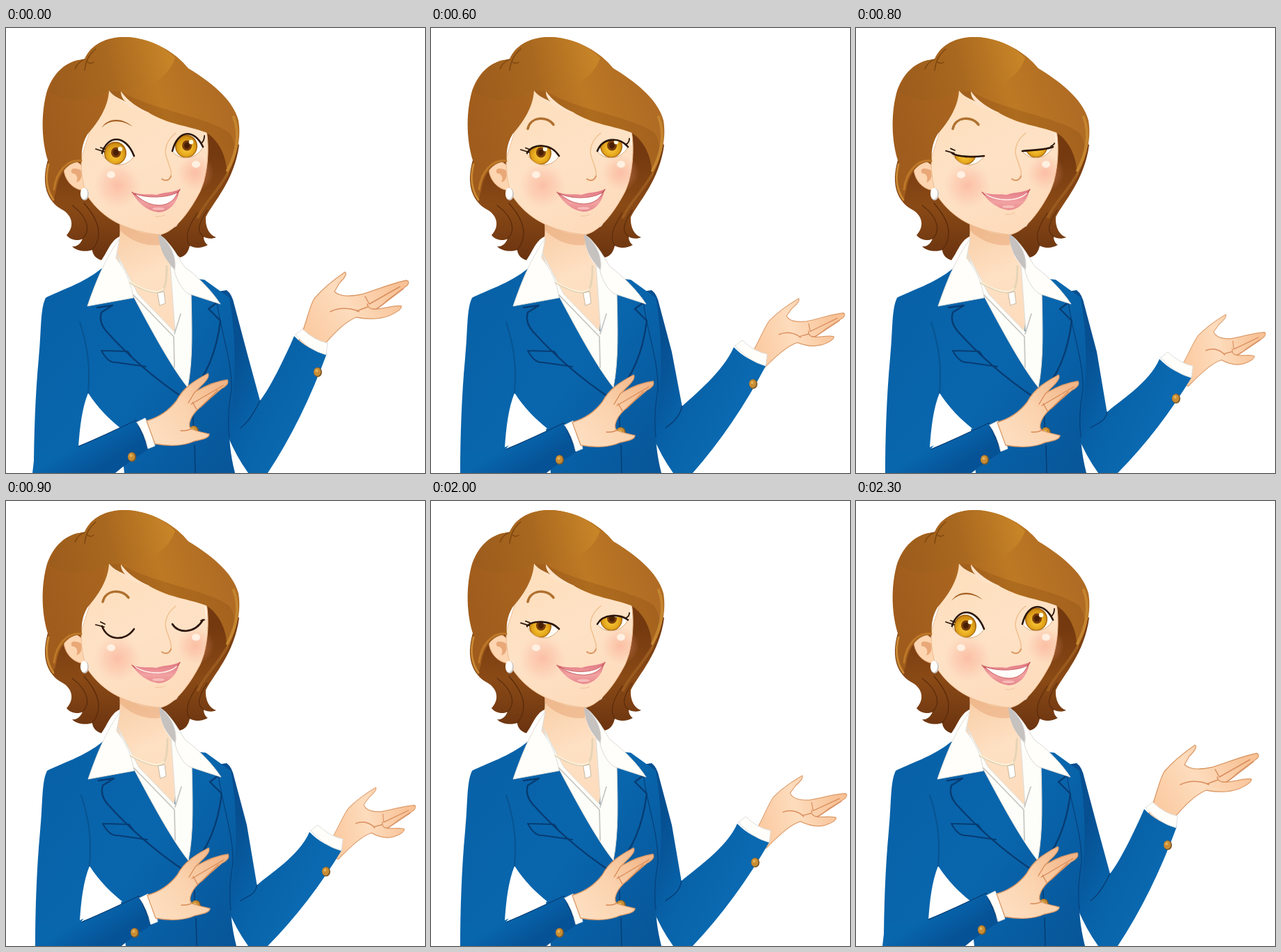
An HTML page with a canvas that plays this animation: 602 by 640 pixels, repeating every 2.8 s.

```html
<!DOCTYPE html>
<html lang="en">
<head>
<meta charset="utf-8">
<title>Presenter</title>
<style>
html, body { margin: 0; width: 100%; height: 100%; overflow: hidden; background: #fff; }
canvas { display: block; }
</style>
</head>
<body>
<canvas id="stage" width="602" height="640"></canvas>
<script>
const ctx = document.getElementById('stage').getContext('2d');
const LOOP = 2800;
const NAVY = '#073c73', EDGE = '#dc9a68', LASH = '#2b150b';

// From looking up with an open arm (first) to eyes shut with a lowered arm (last).
// hand: wrist, thumb tip, fingertip.
const POSES = [
  { eye: 1, mouth: 1, cuff: [0, 0], button: [448, 495], hand: [437, 440, 487, 352, 578, 366] },
  { eye: .87, mouth: 1, cuff: [14, 10], button: [460, 505], hand: [465, 462, 522, 386, 590, 403] },
  { eye: .75, mouth: .75, cuff: [21, 16], button: [463, 512], hand: [471, 468, 528, 390, 594, 413] },
  { eye: .63, mouth: .4, cuff: [26, 21], button: [466, 520], hand: [477, 474, 533, 396, 597, 424] },
  { eye: .33, mouth: 0, cuff: [22, 33], button: [460, 533], hand: [475, 490, 531, 413, 588, 441] },
  { eye: 0, mouth: 0, cuff: [22, 33], button: [460, 533], hand: [475, 490, 531, 413, 588, 441] }
];

function blend(gradient, colors) {
  colors.forEach((c, i) => gradient.addColorStop(i / (colors.length - 1), c));
  return gradient;
}
const linear = (x0, y0, x1, y1, ...colors) => blend(ctx.createLinearGradient(x0, y0, x1, y1), colors);
const radial = (x, y, r, ...colors) => blend(ctx.createRadialGradient(x, y, 0, x, y, r), colors);

function shape(d, fill, edge, width = 1) {
  const path = new Path2D(d);
  if (fill) { ctx.fillStyle = fill; ctx.fill(path); }
  if (edge) { ctx.strokeStyle = edge; ctx.lineWidth = width; ctx.stroke(path); }
}
const line = (d, color, width) => shape(d, null, color, width);

function oval(x, y, rx, ry, fill) {
  ctx.beginPath();
  ctx.ellipse(x, y, rx, ry, 0, 0, 7);
  ctx.fillStyle = fill;
  ctx.fill();
}

function shifted(x, y, draw) {
  ctx.save();
  ctx.translate(x, y);
  draw();
  ctx.restore();
}

function button(x, y, r = 6) {
  oval(x, y, r, r + 1, '#7d5a2b');
  oval(x - .8, y - .5, r - 1, r, '#c98d34');
  oval(x - 1.5, y - 2, r / 3, r / 3, '#e5b45c');
}

const backHair = linear(0, 180, 0, 330, '#74390f', '#8a4a16', '#6b3410');
const frontHair = linear(60, 150, 300, 70, '#a05c1c', '#a8641f', '#bd7923', '#b06c24');
const crown = linear(60, 80, 240, 40, '#9c5c1c', '#a9681f', '#c98628');
const cloth = linear(40, 400, 330, 620, '#0861a7', '#0966ad', '#075699');
const palm = linear(430, 450, 560, 370, '#fbc89e', '#fddcbd', '#f8c296');
const leftPalm = linear(205, 590, 310, 510, '#fddfc2', '#fbd3ae', '#f2b587');

function drawBackHair() {
  shape('M60 190C50 225 59 250 82 262C95 270 99 285 87 298C92 305 104 307 110 303C107 311 101 315 95 314C102 322 118 322 124 319C124 326 130 332 137 334C146 322 150 306 163 300L178 280L112 190Z', backHair);
  shape('M286 140L335 168C328 220 298 250 287 272C286 286 292 298 302 301C296 304 288 303 284 300C284 307 288 311 290 312C280 318 268 316 264 313C262 322 258 328 250 330C240 322 232 312 222 298L245 285L285 220Z', backHair);
  line('M95 255C118 272 122 292 110 303M112 252C137 280 138 302 124 319M289 262C274 285 275 294 284 300M275 266C258 291 258 304 264 313', '#5c2d0c', 1.3);
  line('M318 210C302 238 286 250 276 272', '#9a5a1e', 4);
}

function drawNeck() {
  shape('M162 268C165 292 164 312 156 334L186 384L242 440L246 380L236 340C224 326 220 310 222 290Z', linear(160, 290, 225, 430, '#f9cfa8', '#fee0c3', '#fddcbd'));
  shape('M163 278C184 294 203 298 222 296L221 312C196 315 174 302 164 291Z', 'rgba(224,150,100,.4)');
}

function drawFace() {
  shape('M112 202C102 186 83 188 83 203C84 220 98 234 114 234Z', '#fdd5b0', EDGE);
  shape('M108 205C97 199 91 203 95 209C102 209 104 216 101 222C108 220 110 213 108 205Z', '#e9a878');
  shape('M108 188C108 215 112 235 120 246C135 266 160 290 218 297C236 298 260 272 279 235C291 208 292 170 288 148L250 130L148 88L120 150Z', linear(130, 110, 220, 298, '#fedfbd', '#fee2c6', '#fddbbb'), '#efbd92');
  for (const [x, y, r] of [[160, 226, 34], [272, 208, 27]]) {
    oval(x, y, r, r, radial(x, y, r, 'rgba(249,150,128,.45)', 'rgba(249,160,138,.27)', 'rgba(249,170,145,0)'));
  }
  oval(151, 211, 6, 5, '#fff0e2');
  oval(273, 196, 6, 5, '#fff0e2');
  line('M244 151C232 160 227 173 230 184C234 197 240 209 236 215', '#f0c08f', 1.5);
  line('M224 217C229 221 235 219 237 213', '#dc9560', 2);
  oval(113, 239, 6, 9, '#cfc9c5');
  oval(112, 238, 5, 8, '#fff');
}

function drawEye(x0, y0, x1, y1, topY, lowY, [x, y], open) {
  const lidY = lowY - (lowY - topY) * open;
  const upper = `M${x0} ${y0}C${x0 + 8} ${lidY} ${x1 - 12} ${lidY} ${x1} ${y1}`;
  const lower = `C${x1 - 10} ${lowY} ${x0 + 9} ${lowY} ${x0} ${y0}`;
  ctx.save();
  const eye = new Path2D(upper + lower + 'Z');
  ctx.fillStyle = '#fffdf8';
  ctx.fill(eye);
  ctx.clip(eye);
  oval(x, y, 16, 16.5, '#a9660b');
  oval(x, y + .5, 14.5, 15, radial(x, y + 3, 16, '#f6c945', '#edb323', '#cf8d12'));
  oval(x + 1, y - 1, 7, 7.5, '#7a3d0a');
  oval(x + 1, y - 1, 4, 4.5, '#482006');
  oval(x + 7, y - 6, 3.2, 3.2, '#fff8dc');
  ctx.restore();
  line(`M${x1} ${y1}${lower}`, '#d9a779', 1);
  line(upper, LASH, 2.6);
}

function drawEyes(open) {
  drawEye(138, 180, 184, 184, 153, 202, [157, 180], open);
  drawEye(239, 177, 283, 171, 145, 191, [259, 170], open);
  line(`M141 ${181 - 3 * open}L129 ${178 - 4 * open}M142 ${177 - 3 * open}L136 ${174 - 2 * open}`, LASH, 1.8);
  line(`M280 ${172 - 6 * open}Q285 ${170 - 7 * open} 285 ${171 - 16 * open}`, LASH, 1.8);
  if (open === 1) {
    shape('M137 144C145 130 165 127 182 142C166 132 149 131 137 144Z', '#a35d20');
  } else {
    line('M139 145C143 127 167 126 176 139', '#b0702f', 3.5);
    line('M287 153L288 168', '#fff6e8', 1.5);
  }
}

function drawMouth(open) {
  const jaw = 3 * open;
  shape(`M181 236C195 241 207 238 216 240C226 236 240 237 249 232C247 ${250 + jaw} 233 ${262 + jaw} 219 ${262 + jaw}C203 ${260 + jaw} 189 ${249 + jaw} 181 236Z`, linear(0, 235, 0, 266, '#e27b86', '#f2a2a2', '#e4838a'));
  shape(`M185 238C200 ${250 - 5 * open} 232 ${251 - 6 * open} 247 236C236 ${251 + 13 * open} 202 ${250 + 8 * open} 185 238Z`, '#fffdfa', open > .2 ? '#c9605f' : '#fff3ed', 1);
  oval(219, 257 + jaw, 9, 2, 'rgba(255,215,207,.6)');
  line('M181 236Q183 239 186 240M250 232Q248 236 246 237', '#c0504d', 1.3);
  line(`M215 ${268 + jaw}Q221 ${269 + jaw} 228 ${266 + jaw}`, '#f2c6a2', 1.3);
}

function drawFrontHair() {
  shape('M113 45C122 22 148 12 174 13C214 16 244 36 262 58C290 75 326 101 334 133C338 157 333 184 317 214C319 192 309 163 287 150C264 141 232 139 204 121C181 114 160 104 148 90C147 113 133 135 117 153C109 166 108 180 109 193C92 190 76 207 72 234L68 248C57 230 57 212 61 193C51 164 50 125 58 94C66 66 86 46 113 45Z', frontHair);
  shape('M113 45C122 22 148 12 174 13C208 15 230 30 243 43C231 77 198 91 148 90C123 106 88 108 62 92C70 64 88 46 113 45Z', crown);
  shape('M148 90C161 108 185 115 204 121C236 139 264 141 287 150C309 163 319 192 317 214C331 190 332 164 320 150C289 128 207 117 165 91Z', 'rgba(120,61,16,.22)');
  shape('M165 91C176 106 190 115 206 122C186 120 166 108 151 95C158 99 166 103 172 106C167 102 165 96 165 91Z', '#fde3c8');
  line('M129 30C120 38 115 45 113 61M113 45C107 47 102 52 99 59M116 48Q121 53 126 49', '#80480f', 1.6);
  line('M61 196C56 216 59 234 68 247', '#c98834', 3);
  line('M108 191C88 188 72 207 69 232', '#bd7828', 3);
  line('M327 128C337 153 331 181 318 205', '#c4852f', 4);
}

function drawRightArm({ cuff: [dx, dy], button: [bx, by], hand }) {
  ctx.save();
  const [wx, wy, tx, ty, fx, fy] = hand;
  const rest = new DOMMatrix([50, -88, 141, -74, 437, 440]);
  const now = new DOMMatrix([tx - wx, ty - wy, fx - wx, fy - wy, wx, wy]);
  const m = now.multiply(rest.inverse());
  ctx.transform(m.a, m.b, m.c, m.d, m.e, m.f);
  shape('M416 460C432 430 434 403 443 389C455 375 471 362 487 351C491 353 486 360 479 367L472 379C479 387 496 386 511 383C532 377 554 367 575 363C580 364 579 369 574 372L548 391C543 397 537 401 532 404C545 404 558 398 568 400C569 405 559 410 550 414C534 420 519 419 503 416C486 423 470 440 450 464Z', palm, EDGE, 1.3);
  line('M516 386L522 397L566 372M519 397C520 403 526 405 533 404L571 375M520 401L504 407M466 408C482 400 500 404 507 408', '#d98e5e', 1.5);
  ctx.restore();

  const p = (x, y) => `${x + dx} ${y + dy}`;
  const bend = dy * .5, elbow = 365 - dx * .2;
  shape(`M298 380L317 377Q325 383 328 398L346 466L${elbow} ${536 + bend}C378 ${520 + bend} ${p(399, 478)} ${p(414, 443)}Q${p(434, 464)} ${p(461, 468)}Q${425 + dx * .5} ${566 + dy * .4} 376 640L348 640Q330 615 318 585L296 480Z`, linear(310, 500, 430, 560, '#064f91', '#0862a8', '#0a69b0'));
  line(`M${elbow} ${536 + bend}C358 ${550 + bend} 349 567 337 575`, NAVY, 1.3);
  shape(`M${p(416, 441)}L${p(426, 433)}Q${p(444, 450)} ${p(462, 453)}L${p(460, 470)}Q${p(434, 463)} ${p(416, 441)}Z`, '#fffefa', '#dedfdf');
  button(bx, by, 6);
}

function drawJacket() {
  shape('M137 346C112 367 76 378 57 388C49 404 51 435 47 475C42 528 40 590 40 640L77 640L110 600L118 525C132 548 149 563 163 575L170 640L329 640C322 612 320 590 321 562C331 514 331 448 321 388L285 362Z', cloth);
  shape('M118 525C133 548 149 563 165 576L104 603C106 575 109 547 118 525Z', '#fff');
  line('M106 423C118 460 121 488 118 525', '#075490', 2);
  line('M303 394C309 438 325 480 324 520C320 545 318 565 321 588', '#06427d', 1.3);
  line('M131 402L153 399L137 409C134 419 138 429 144 436C179 475 219 508 255 532M291 404L308 421C303 461 290 499 264 526M304 394L291 404', NAVY, 2.3);
  line('M137 464L175 465L180 472M137 464C144 477 151 482 159 481L201 487', NAVY, 2);
  line('M253 528C266 544 270 555 269 575M271 600L272 640', NAVY, 1.5);
}

function drawShirt() {
  shape('M158 322L182 384C207 431 237 487 261 517C269 477 267 429 266 381L236 340L243 438L190 383Z', '#fdfdf9', '#dddcd7');
  shape('M163 303C151 320 136 344 117 400L183 388C179 363 171 347 158 331Z', '#fffefa', '#dfddd8');
  shape('M219 296C238 307 244 327 243 348C229 334 220 319 219 296Z', '#c5c2c0');
  shape('M226 302C243 317 250 336 257 344C274 356 295 377 308 397L262 382C252 376 245 361 242 350C246 334 239 315 226 302Z', '#fffefa', '#dcdad7');
  line('M183 384L241 444L242 488M242 440L251 411', '#c6c5c0', 1.7);
  ctx.setLineDash([2, 1.5]);
  line('M178 366C194 375 216 386 226 376Q231 368 231 341', '#e5d4b5', 3);
  ctx.setLineDash([]);
  line('M178 365C194 374 216 385 226 375', '#fff9e6', 1.4);
  shape('M218 381L227 379L229 396L221 399Z', '#fff', '#c7b89f');
}

function drawLeftArm(moved) {
  shifted(moved * 4, moved * 4, () => {
    shape('M42 605C62 609 83 608 104 601C132 590 162 576 187 563Q198 583 206 605C185 619 170 629 157 640L38 640Z', linear(100, 600, 125, 640, '#0866ad', '#065296'));
    line('M104 602C132 590 162 576 187 564M187 564L205 605', NAVY, 1.2);
    shape('M188 567L200 561Q209 579 214 601L204 605Q199 583 188 567Z', '#fffefa', '#dddfe0');
    button(181, 617, 6);
  });
  button(270 + moved * 3, 580 + moved * 2, 7);
  shifted(moved, moved * 2, () => {
    shape('M202 565C220 560 235 549 245 536C255 517 271 507 290 497C293 501 288 507 283 512L271 524L274 522C286 515 303 508 318 506C321 511 315 516 309 519C296 530 286 539 275 549C266 558 260 571 266 577C275 580 284 582 292 584C292 590 281 592 271 594C254 602 231 601 214 598Z', leftPalm, EDGE, 1.3);
    line('M271 524L262 539M266 541L312 514M268 538L274 549M280 545L304 521M251 579Q258 580 265 577', '#d88b58', 1.4);
  });
}

function draw(time) {
  const n = Math.floor((time % LOOP) / 100);
  const index = Math.max(0, Math.min(n - 4, 23 - n, 5));
  const pose = POSES[index], moved = index ? 1 : 0;
  ctx.fillStyle = '#fff';
  ctx.fillRect(0, 0, 602, 640);
  ctx.lineCap = ctx.lineJoin = 'round';
  drawRightArm(pose);
  shifted(moved * 2, 0, drawJacket);
  drawBackHair();
  drawNeck();
  shifted(moved, 0, drawShirt);
  drawLeftArm(moved);
  drawFace();
  drawEyes(pose.eye);
  drawMouth(pose.mouth);
  drawFrontHair();
}

const start = performance.now();
function tick() {
  draw(performance.now() - start);
  requestAnimationFrame(tick);
}
tick();
</script>
</body>
</html>
```
